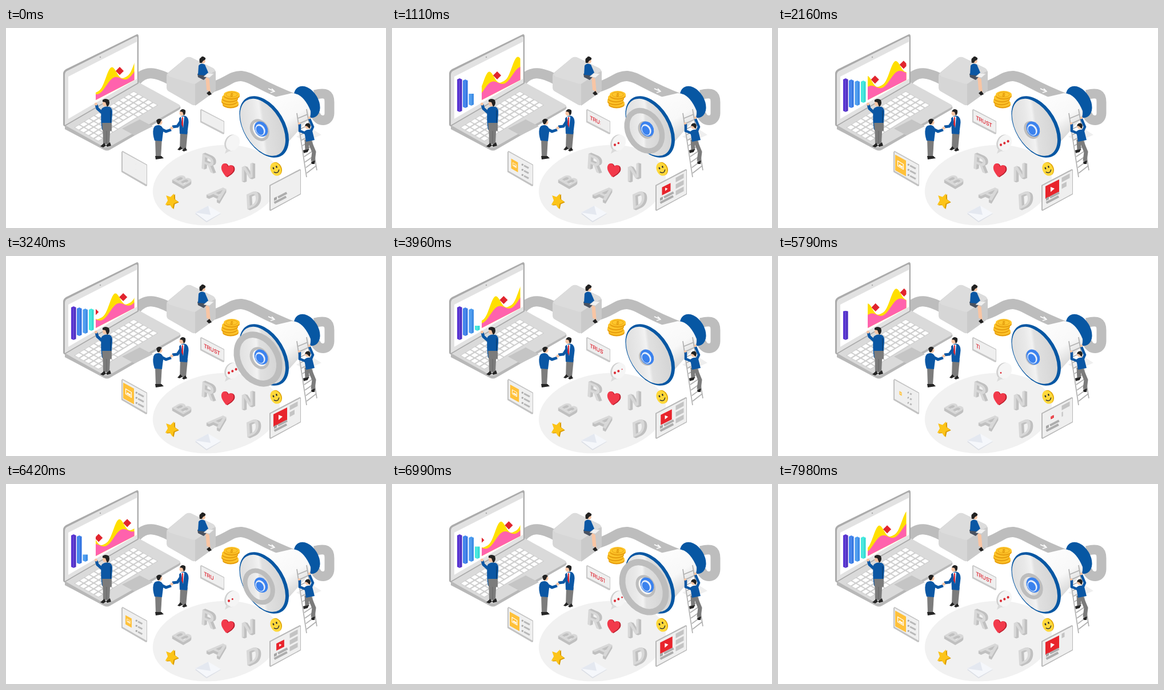
Write an HTML page that moves like this. It is 665 px wide and 350 px high and loops after 8 s.

```html
<!DOCTYPE html>
<html lang="en">
<head>
<meta charset="utf-8">
<title>Brand campaign</title>
<style>
html,body{margin:0;width:100%;height:100%;overflow:hidden;background:#fff}
svg{display:block;width:100vw;height:100vh}
text{font-family:"Liberation Sans",Arial,sans-serif}
</style>
</head>
<body>
<svg id="stage" viewBox="0 0 665 350" xmlns="http://www.w3.org/2000/svg">
<defs>
  <linearGradient id="face" x1="0" y1=".2" x2=".8" y2=".8">
    <stop offset="0" stop-color="#dcdcdc"/><stop offset=".4" stop-color="#e9e9e9"/>
    <stop offset=".55" stop-color="#f2f2f2"/><stop offset=".62" stop-color="#e0e0e0"/><stop offset="1" stop-color="#d6d6d6"/>
  </linearGradient>
  <linearGradient id="horn" x1="0" y1="0" x2=".6" y2="1">
    <stop offset="0" stop-color="#fff"/><stop offset=".6" stop-color="#f8f8f8"/><stop offset="1" stop-color="#c9c9c9"/>
  </linearGradient>
  <clipPath id="chartClip"><path d="M157 30H224.5V91L157 126Z"/></clipPath>
  <clipPath id="wordClip"><rect id="wordBox" x="0" y="-14" width="0" height="20"/></clipPath>
</defs>

<ellipse cx="368" cy="275" rx="112" ry="69" transform="rotate(-9 368 275)" fill="#f1f1f1"/>

<!-- pipe -->
<g fill="none" stroke="#bdbdbd" stroke-width="18">
  <path d="M228 92C242 76 258 74 290 92"/>
  <path d="M358 104C384 98 394 83 412 84C432 86 440 100 512 127"/>
  <path d="M540 117C560 112 566 116 566 130V149C566 165 546 166 541 150" stroke-width="17"/>
</g>
<path d="M459 106L468 110M465 106L470 111L463 113" fill="none" stroke="#fff" stroke-width="1.5"/>

<!-- laptop -->
<path d="M103 171L232 97L303 135Q308 139 303 143L182 213Q177 216 171 213L103 177Z" fill="#b8b8b8"/>
<path d="M103 170L232 95L303 134Q307 137 303 139L181 208Q176 210 171 208Z" fill="#dadada"/>
<g transform="matrix(8.7 -5.3 8.6 4.9 119 174)">
  <path d="M0 0H12V5H0Z" fill="#cfcfcf"/>
  <g id="keys" fill="#fff"></g>
</g>
<path d="M203 176L234 160L257 172L225 188Z" fill="#c5c5c5"/>
<path d="M100 80Q100 75 105 72L227 12Q232 9 232 15V97L103 172Q100 172 100 168Z" fill="#ababab"/>
<path d="M103 82Q103 77 107 75L227 15Q230 14 230 18V96L103 170Z" fill="#e2e2e2"/>
<path d="M109 85L229 24V89L109 159Z" fill="#fff"/>
<circle cx="165" cy="51" r="1.2" fill="#aaa"/>
<g id="bars"></g>
<g clip-path="url(#chartClip)">
  <path id="yellow" fill="#ffdf00"/>
  <path id="pink" fill="#ff62ad"/>
  <g id="badges" fill="#e1252e"></g>
</g>

<!-- box -->
<path d="M281 84Q281 80 285 77L314 53Q319 49 325 52L362 70Q367 73 367 78V106Q367 110 363 113L335 133Q330 137 325 134L285 111Q281 109 281 104Z" fill="#d6d6d6"/>
<path d="M282 81L314 53Q319 49 325 52L362 70Q368 73 363 77L335 96Q330 99 325 97L286 85Z" fill="#dcdcdc"/>
<path d="M331 98L363 77L367 76V106Q367 110 363 113L331 136Z" fill="#cacaca"/>

<!-- seated woman -->
<path d="M347 86L354 90L356 113M343 84L351 87L353 109" fill="none" stroke="#f8c5a4" stroke-width="3.6"/>
<path d="M351 114L356 110L360 116L355 118Z" fill="#222"/>
<path d="M335 80L348 79L352 85L346 91L336 86Z" fill="#4a5260"/>
<path d="M337 66Q341 60 348 64L354 78L350 83L336 82Z" fill="#0b57a4"/>
<path d="M346 85L353 79L364 80L356 87Z" fill="#f0f0f0" stroke="#ccc" stroke-width=".6"/>
<circle cx="345" cy="58" r="3.8" fill="#f8c5a4"/>
<path d="M339 61Q337 53 341 52Q343 48 347 51Q351 53 348 56Q344 57 343 61Z" fill="#222"/>

<!-- man at the screen -->
<path d="M169 163H183L181 203H170Z" fill="#7c7c7c"/>
<path d="M176 180V203" stroke="#666" stroke-width="1"/>
<path d="M165 207L172 201L175 206L170 209ZM175 205L182 200L184 206L177 208Z" fill="#252525"/>
<path d="M168 148L160 141L158 134" fill="none" stroke="#0b57a4" stroke-width="5"/>
<circle cx="157.5" cy="133" r="2.6" fill="#f8c5a4"/>
<path d="M167 142Q171 136 181 138Q187 140 186 150L184 178L168 178Q165 160 167 142Z" fill="#0b57a4"/>
<path d="M168 166H185V180H169Z" fill="#7c7c7c"/>
<path d="M183 144V166" stroke="#08447f" stroke-width="2"/>
<circle cx="174" cy="132" r="5" fill="#f8c5a4"/>
<path d="M169 126Q174 122 180 126Q183 134 177 138L174 130L169 129Z" fill="#222"/>

<!-- handshake -->
<path d="M261 193H273L271 226H262Z" fill="#7c7c7c"/>
<path d="M261 224H272L276 228L262 230Z" fill="#252525"/>
<path d="M270 176L280 181L289 178" fill="none" stroke="#0b57a4" stroke-width="5"/>
<path d="M258 176Q260 169 268 170Q276 172 275 182L273 198L260 197Q256 185 258 176Z" fill="#0b57a4"/>
<circle cx="269" cy="165" r="4.5" fill="#f8c5a4"/>
<path d="M263 162Q267 156 273 161L271 163Q269 170 265 168Z" fill="#222"/>
<path d="M305 181H318L315 212H304Z" fill="#7c7c7c"/>
<path d="M300 213L305 207L309 211L304 214ZM308 214L314 209L317 214L311 216Z" fill="#252525"/>
<path d="M307 161L300 172L291 173" fill="none" stroke="#0b57a4" stroke-width="5"/>
<path d="M303 158Q309 151 316 155Q321 160 319 170L317 186L304 185Z" fill="#0b57a4"/>
<path d="M306 155L312 155L310 175Z" fill="#fff"/>
<path d="M308 156L310 156L310 174L307 169Z" fill="#d92632"/>
<circle cx="290" cy="175" r="2.6" fill="#f8c5a4"/>
<circle cx="308" cy="149" r="4.6" fill="#f8c5a4"/>
<path d="M304 146Q308 139 314 144Q315 151 311 153L309 147Z" fill="#222"/>

<g id="coins"></g>

<!-- word panel -->
<path d="M340 143L342 142L382 163V185L380 186L340 165Z" fill="#c8c8c8"/>
<path d="M342 144L381 164V183L342 163Z" fill="#efefef"/>
<g transform="matrix(.87 .44 0 1 346.5 160)">
  <text clip-path="url(#wordClip)" font-size="9.6" fill="#dd2733" stroke="#dd2733" stroke-width=".25">TRUST</text>
</g>

<!-- picture panel -->
<path d="M202 217L204 215L247 239V276L245 277L202 252Z" fill="#c2c2c2"/>
<path d="M204 217L246 240V274L204 250Z" fill="#efefef"/>
<g id="photo">
  <path d="M-9.5 -19L9.5 -8.5V19L-9.5 8.5Z" fill="#ffc13a"/>
  <path d="M-5 -8L5 -2V7L-5 1Z" fill="none" stroke="#fff" stroke-width="1.2"/>
  <path d="M-4 0L-1 -2L1 1L3 0L4 5Z" fill="#fff"/>
</g>
<g id="list"></g>

<!-- chat bubble -->
<g transform="rotate(25 397 201)">
  <ellipse cx="395" cy="202" rx="12" ry="15" fill="#d0d0d0"/>
  <ellipse cx="397" cy="201" rx="11.5" ry="14.5" fill="#f5f5f5"/>
</g>
<path d="M386 211L383 220L393 214Z" fill="#dadada"/>
<g id="dots" fill="#dc2932"></g>

<!-- megaphone -->
<path d="M508 190L535 176L552 187L524 199Z" fill="#efefef"/>
<ellipse cx="526.5" cy="129.5" rx="20" ry="30" transform="rotate(-31 526.5 129.5)" fill="#0757a3"/>
<path d="M440 128L500 114Q520 114 533 145Q534 156 529 160L482 213Z" fill="url(#horn)"/>
<ellipse cx="451.7" cy="173" rx="36" ry="59" transform="rotate(-31 451.7 173)" fill="#0757a3"/>
<ellipse cx="449.3" cy="173.8" rx="32.5" ry="55" transform="rotate(-31 449.3 173.8)" fill="url(#face)"/>
<g id="wave"></g>
<g transform="rotate(-31 446 177)" fill="#3b82ee">
  <ellipse cx="446.5" cy="177" rx="11" ry="14"/>
  <ellipse cx="444.5" cy="177.5" rx="8" ry="10.5" fill="#e6eefb"/>
  <ellipse cx="443.5" cy="178" rx="6" ry="8.5"/>
</g>

<!-- ladder and climber -->
<g id="ladder" fill="none" stroke="#b0b0b0" stroke-width="1.7"></g>
<path d="M530 195L539 217L537 233M526 195L527 214" fill="none" stroke="#7c7c7c" stroke-width="7"/>
<path d="M534 234L541 232L540 238L535 238ZM520 214L530 212L528 217L521 219Z" fill="#252525"/>
<path d="M524 184L514 180L514 168M533 182L537 173L531 159" fill="none" stroke="#0b57a4" stroke-width="4.5"/>
<path d="M522 181Q529 175 536 180L540 196L525 199Z" fill="#0b57a4"/>
<circle cx="513" cy="167" r="2" fill="#f8c5a4"/><circle cx="531" cy="157" r="2.2" fill="#f8c5a4"/>
<circle cx="528" cy="172" r="4.6" fill="#f8c5a4"/>
<path d="M523 171Q525 165 531 167Q535 171 531 176L527 172Z" fill="#222"/>

<!-- ground objects -->
<g id="letters" font-weight="bold" text-anchor="middle"></g>
<g transform="translate(388 248) rotate(12)">
  <path d="M2 13C-7 6 -13 0 -10 -7C-7 -12 -1 -10 1 -5C4 -11 11 -10 12 -3C13 3 7 8 2 13Z" fill="#b91f2d"/>
  <path d="M0 13C-9 6 -14 0 -11 -7C-8 -12 -2 -10 -1 -5C2 -11 9 -10 10 -3C11 3 5 8 0 13Z" fill="#f23a4b"/>
</g>
<path id="starBack" fill="#d99a00"/><path id="star" fill="#fcc419"/>
<g transform="translate(472 247) rotate(-25)">
  <ellipse cx="1.5" rx="9" ry="12" fill="#dda000"/><ellipse rx="9" ry="12" fill="#ffd83a"/>
  <ellipse cx="-3" cy="-3" rx="1.3" ry="2" fill="#333"/><ellipse cx="3" cy="-3" rx="1.3" ry="2" fill="#333"/>
  <path d="M-5 3Q0 10 5 3" fill="none" stroke="#333" stroke-width="1.4"/>
</g>
<path d="M331 325L354 312L376 325L351 340Z" fill="#dcdfe6"/>
<path d="M331 323L354 311L376 324L351 338Z" fill="#f5f7fb"/>
<path d="M331 323L358 327L354 311Z" fill="#e4e8f0"/>

<!-- video panel -->
<path d="M461 275L514 247L516 248V291L463 320L461 319Z" fill="#b8b8b8"/>
<path d="M463 276L515 249V290L463 318Z" fill="#efefef"/>
<g id="video">
  <path d="M-12 -5L12 -17V5L-12 17Z" fill="#e8242c"/>
  <path d="M-3 -4L4 -1L-3 5Z" fill="#fff"/>
</g>
<path d="M469 297.5L474 295V300L469 302.5Z" fill="#a4a4a4"/>
<g id="captions" fill="none" stroke="#adadad" stroke-width="4"></g>
<g id="blocks" fill="#c4c4c4"></g>
</svg>

<script>
const $ = id => document.getElementById(id);
const NS = "http://www.w3.org/2000/svg";
const LOOP = 8000, HALF = 2700, GROW = 1776, TILT = -31;
const clamp = x => Math.max(0, Math.min(1, x));
const times = (n, f) => Array.from({length: n}, (_, i) => f(i));
const fill = (id, n, f) => { $(id).innerHTML = times(n, f).join(""); };
const bounce = (t, half) => half - Math.abs(t % (2 * half) - half);
const set = (el, attrs) => { for (const k in attrs) el.setAttribute(k, attrs[k]); };

function add(id, tag, n) {
  return times(n, () => $(id).appendChild(document.createElementNS(NS, tag)));
}

// fixed details
fill("keys", 60, i => {
  const c = i % 12, r = Math.floor(i / 12);
  if (r === 4 && c > 3 && c < 8) return c === 4 ? `<rect x="4.08" y="4.1" width="3.8" height=".72"/>` : "";
  return `<rect x="${c + .1}" y="${r + .12}" width=".78" height=".74" rx=".1"/>`;
});
fill("coins", 4, i => {
  const x = 392 + [1, -1, 0, 3][i], y = 131.5 - i * 5;
  return `<ellipse cx="${x}" cy="${y + 2.5}" rx="14" ry="6.5" fill="#e8a010"/>
    <ellipse cx="${x}" cy="${y}" rx="14" ry="6.5" fill="#ffc62b"/>`;
});
$("coins").innerHTML += `<ellipse cx="395" cy="116.5" rx="10" ry="4.4" fill="none" stroke="#e9a313"/>
  <text x="395" y="120" font-size="9" font-weight="bold" text-anchor="middle" fill="#dd9308" transform="rotate(20 395 117)">$</text>`;
$("ladder").innerHTML = `<path d="M509 149L526 261M526 142L544 249"/>` +
  times(11, i => `<path d="M${511 + i * 1.52} ${158 + i * 9.6}L${528 + i * 1.5} ${151 + i * 9}"/>`).join("");

// letter, pose, size, direction of thickness
const glyphs = [
  ["R", "matrix(.87 .38 -.06 1 352 250)", 38, .9, -.3],
  ["N", "matrix(.87 -.36 0 1 422 265)", 37, .9, .3],
  ["D", "matrix(.87 -.4 .05 1 432 313)", 38, .9, .3],
  ["B", "matrix(.87 -.5 .87 .5 318.5 272)", 33, 0, 1],
  ["A", "matrix(.87 .4 -.75 .6 362 297)", 40, 0, 1]
];
$("letters").innerHTML = glyphs.map(([ch, pose, size, dx, dy]) => times(6, i =>
  `<g transform="translate(${dx * (5 - i)} ${dy * (5 - i)})"><text transform="${pose}" font-size="${size}" fill="${i < 5 ? "#c0c0c0" : "#d8d8d8"}">${ch}</text></g>`
).join("")).join("");

const starPath = (cx, cy) => "M" + times(10, i => {
  const a = i * Math.PI / 5 - 1.15, r = i % 2 ? 7 : 14;
  return `${cx + r * .85 * Math.cos(a)} ${cy + r * Math.sin(a)}`;
}).join("L") + "Z";
set($("starBack"), {d: starPath(291, 303.5)});
set($("star"), {d: starPath(289, 302.5)});

// moving parts
const barSpecs = [
  [114, 147, 57, "#5a35d2", "#4f2fc4"], [124, 140, 48, "#4285ee", "#3576e2"],
  [134.5, 136, 42, "#4a9cf0", "#3f8ee6"], [145, 131, 37, "#45eadf", "#36dcd4"]
];
const bars = barSpecs.map(([, , , light, dark]) => {
  const parts = add("bars", "path", 3);
  [light, dark, light].forEach((c, i) => set(parts[i], {fill: c}));
  return parts;
});
const badges = add("badges", "rect", 3);
const dots = add("dots", "ellipse", 3);
const rows = add("list", "path", 6);
const captions = add("captions", "path", 2);
const blocks = add("blocks", "path", 3);
const rings = add("wave", "ellipse", 2);

const baseY = x => 126 - (x - 157) * .52;

function area(id, height) {
  let d = "M157 128";
  for (let x = 157; x <= 225; x++) d += `L${x} ${(baseY(x) - height(x)).toFixed(2)}`;
  set($(id), {d: d + "V92Z"});
}

function drawBars(u) {
  barSpecs.forEach(([x, bottom, full], i) => {
    const k = clamp(u / 444 - i), top = bottom - full * k, mid = x + 4.3, end = x + 8.6;
    const cap = 2 * clamp((k - .8) * 5), foot = Math.min(2, full * k);
    const d = [
      `M${x} ${top}H${mid}V${bottom}L${x} ${bottom - foot}Z`,
      `M${mid} ${top}H${end}V${bottom - foot}L${mid} ${bottom}Z`,
      `M${x} ${top}L${mid} ${top - cap}L${end} ${top}L${mid} ${top + cap}Z`
    ];
    d.forEach((p, j) => set(bars[i][j], {d: k > .02 ? p : ""}));
  });
}

function drawChart(t) {
  const span = 50, lead = 199 - t * .01353;
  const wave = (x, shift) => .5 + .5 * Math.cos((x - lead + shift) * 2 * Math.PI / span);
  area("yellow", x => 13 + 30 * wave(x, 15) ** 1.6);
  area("pink", x => 8 + 15 * wave(x, 11));
  const first = 150 + ((lead - 150) % span + span) % span;
  badges.forEach((b, i) => {
    const x = first + i * span, y = baseY(x) - 29;
    set(b, {x: x - 5, y: y - 5, width: 10, height: 10, transform: `rotate(45 ${x} ${y})`});
  });
}

function drawRing(el, r, opacity, width, inner) {
  const s = r / 46, cx = 445.5 - 4.5 * s, cy = 177.5 + 3 * s;
  set(el, {
    cx, cy, opacity,
    rx: Math.max(0, r * .88 - width / 2),
    ry: Math.max(0, r * 1.14 - width / 2),
    transform: `rotate(${TILT} ${cx} ${cy})`,
    fill: inner, stroke: "#bdbdbd", "stroke-width": width
  });
}

function drawWaves(t) {
  const p = t % 1860 / 1860;
  drawRing(rings[0], 6 + 52 * p, clamp((.96 - p) / .12), 4 + 9 * p, "url(#face)");
  const near = p < .06 ? 18 * (1 - p / .06) : 8 + 10 * clamp((p - .38) / .35);
  drawRing(rings[1], near, p < .06 || p > .38 ? 1 : 0, 5, "#f4f4f4");
}

function drawPanels(t, u) {
  const k = clamp(u / GROW);
  set($("wordBox"), {width: 33 * clamp(u / GROW)});
  set($("photo"), {transform: `translate(214.5 240.5) scale(${k})`});
  set($("video"), {transform: `translate(480 282) scale(${k})`});
  dots.forEach((d, i) => {
    const s = clamp(u / 592 - i);
    set(d, {cx: 390 + i * 6.3, cy: 204.5 - i * 3.1, rx: 2 * s, ry: 2.2 * s});
  });
  rows.forEach((row, i) => {
    const wide = i % 2, y = 238.5 + (i >> 1) * 9 + wide * 2.2;
    const w = wide ? 10 * clamp(k * 1.3) : 2.6 * clamp(k * 3);
    set(row, {
      d: `M${wide ? 231 : 227} ${y}l${w} ${w * .54}`,
      stroke: wide ? "#b8b8b8" : "#a8a8a8",
      "stroke-width": w ? 3 : 0
    });
  });
  const v = bounce(t, HALF / 2) / (HALF / 2);
  captions.forEach((line, i) => {
    const w = (i ? 23 : 17) * (.9 + .1 * v);
    set(line, {d: `M${i ? "469.5 306" : "476 296.5"}l${w} ${-w * .52}`});
  });
  blocks.forEach((b, i) => {
    const w = 14 * clamp(v * 4 - i), y = 262 + i * 11.5;
    set(b, {d: w ? `M496.5 ${y}l${w} ${-w * .53}v8l${-w} ${w * .53}Z` : ""});
  });
}

function render(t) {
  const u = bounce(t, HALF);
  drawBars(u);
  drawChart(t);
  drawWaves(t);
  drawPanels(t, u);
}

const start = performance.now();
function tick() {
  render((performance.now() - start) % LOOP);
  requestAnimationFrame(tick);
}
render(0);
requestAnimationFrame(tick);
</script>
</body>
</html>
```
